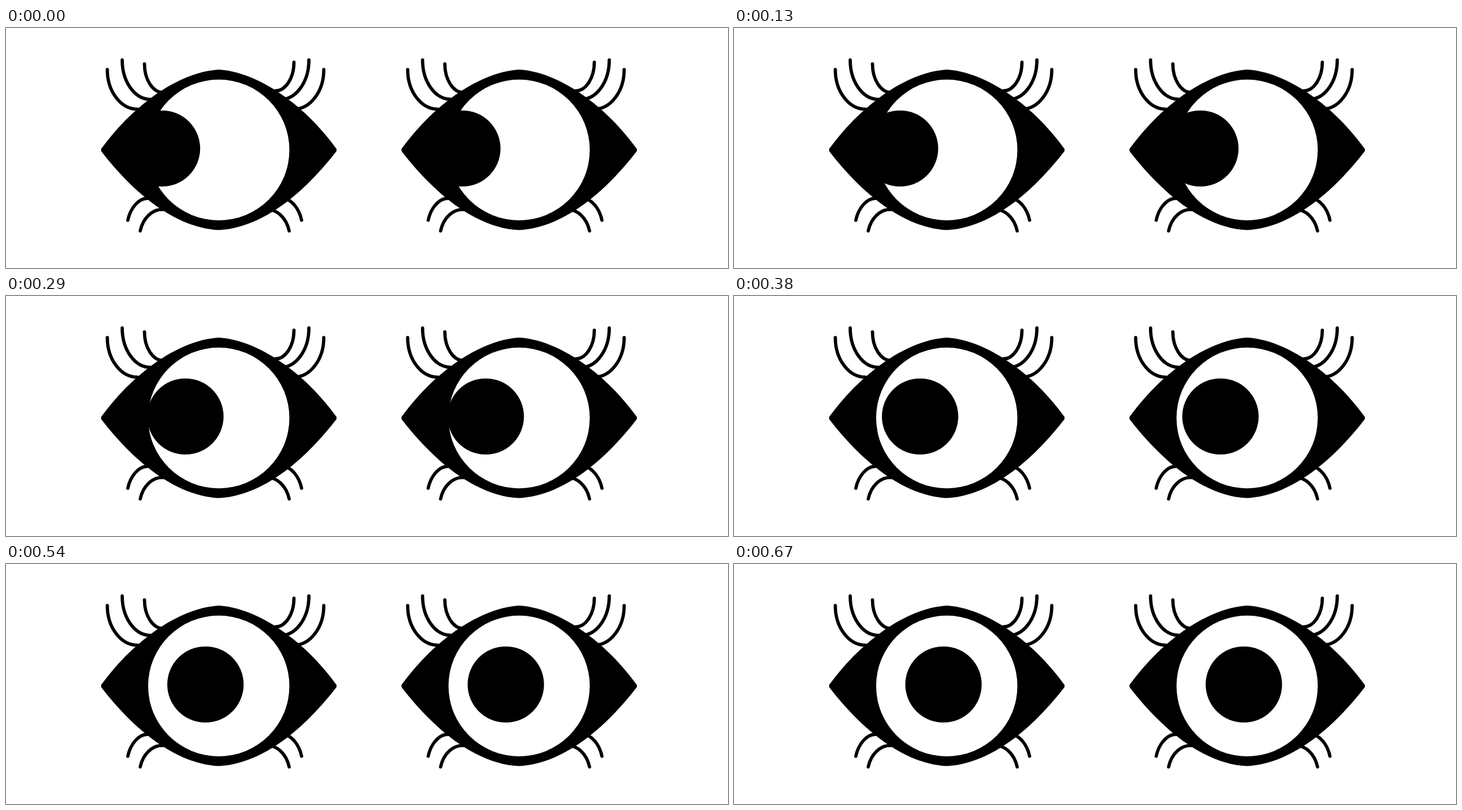
An HTML page for the animation above (1.18 s loop, 1280 by 427 pixels).

```html
<!DOCTYPE html>
<html lang="en">
<head>
<meta charset="utf-8">
<title>Looking eyes</title>
<style>
  html, body { margin: 0; width: 100%; height: 100%; overflow: hidden; background: #fff; }
  svg { display: block; width: 100%; height: 100%; }
</style>
</head>
<body>
<svg viewBox="0 0 1280 427">
  <defs>
    <g id="upper">
      <path d="M179.600 74A53.400 70.500 0 0 0 233 144.500"/>
      <path d="M206 57A50 70 0 0 0 256 127"/>
    </g>
    <g id="lower">
      <path d="M216 342C220 322 234 303 251 303"/>
      <path d="M238 361C243 338 260 321 280 323"/>
    </g>
    <g id="eye">
      <path d="M171 212C230 132 310 78 377.2 74C444.400 78 524.400 132 583.600 212Q588.600 217 583.600 222C529.400 291.500 456.400 355.500 377.2 359.600C298 355.500 225 291.500 171 222Q166 217 171 212Z"/>
      <circle cx="377.2" cy="217" r="125.200" fill="#fff"/>
      <g fill="none" stroke="#000" stroke-width="5.8" stroke-linecap="round">
        <use href="#upper"/>
        <use href="#upper" transform="translate(743 0) scale(-1 1)"/>
        <path d="M245.500 64A33.500 51 0 0 0 279 115"/>
        <path d="M510.500 61A33.500 51 0 0 1 477 112"/>
        <use href="#lower"/>
        <use href="#lower" transform="translate(740 0) scale(-1 1)"/>
      </g>
      <circle id="pupil" cx="276.5" cy="214.4" r="67.7"/>
    </g>
  </defs>
  <use href="#eye"/>
  <use href="#eye" x="532.5"/>
</svg>
<script>
  const LOOP = 1180, FPS = 24, STEPS = 16;
  const START_X = 276.5, TRAVEL = 94.9;
  const pupil = document.getElementById('pupil');

  // Steps run at 24 per second, with each change rounded to 10 ms.
  function stepAt(t) {
    const tick = Math.floor(t / 10) * 10;
    return Math.min(STEPS, Math.floor((tick + 4.9) * FPS / 1000));
  }

  function draw(t) {
    pupil.setAttribute('cx', START_X + TRAVEL * stepAt(t) / STEPS);
  }

  let start;
  function frame(now) {
    start ??= now;
    draw(Math.max(0, now - start) % LOOP);
    requestAnimationFrame(frame);
  }
  requestAnimationFrame(frame);
</script>
</body>
</html>
```
